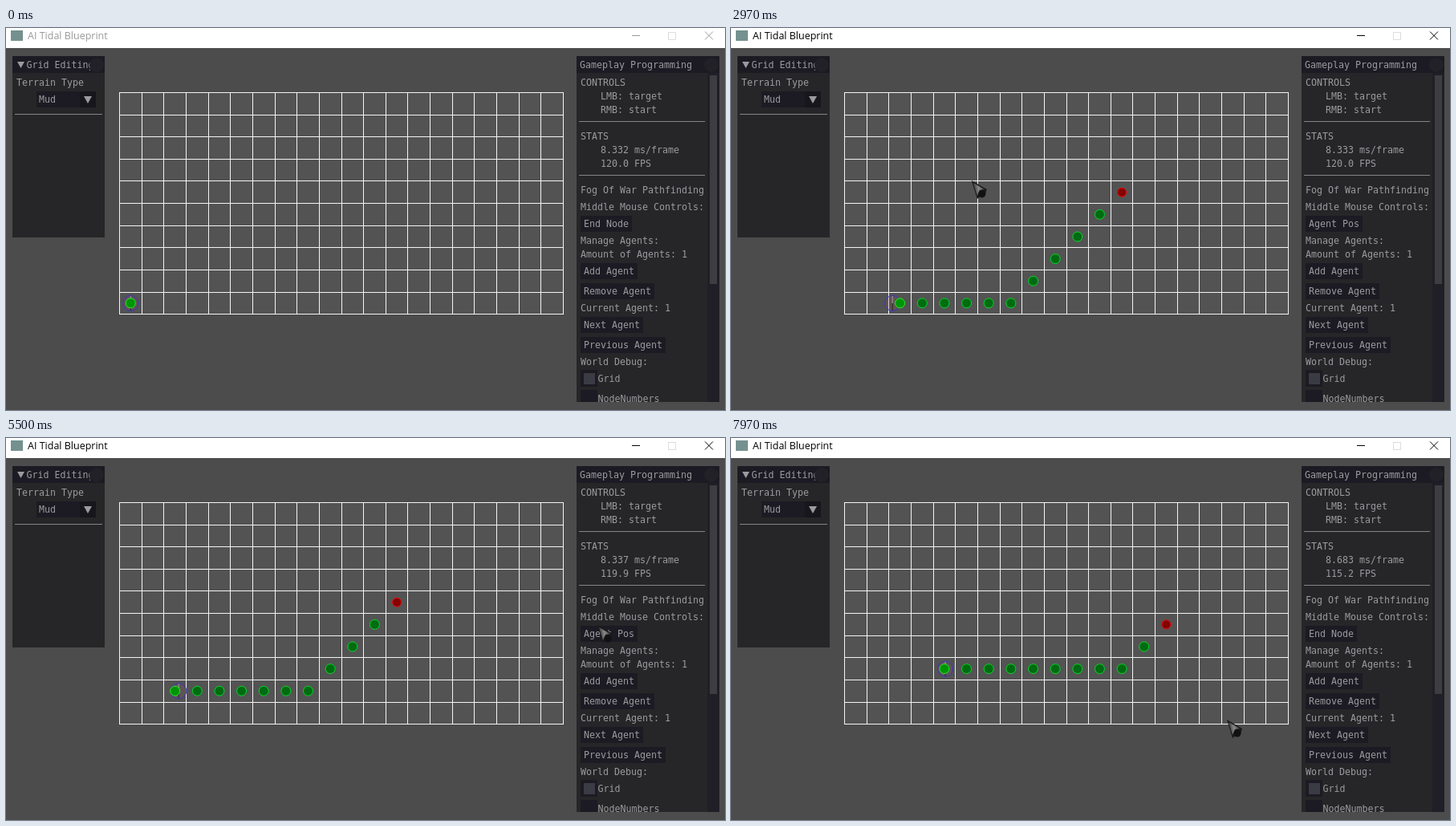
An HTML page with a canvas that plays this animation: 896x476 px, repeating every 8 s.

```html
<!DOCTYPE html>
<html lang="en">
<head>
<meta charset="utf-8">
<title>Grid pathfinding</title>
<style>
  html, body { margin: 0; width: 100%; height: 100%; overflow: hidden; background: #4c4c4c; }
  canvas { display: block; }
</style>
</head>
<body>
<canvas id="stage" width="896" height="476"></canvas>
<script>
const ctx = document.getElementById('stage').getContext('2d');
const LOOP = 8;
const COLS = 20, ROWS = 10;
const LEFT = 141.5, TOP = 80.45, CELL_W = 27.65, CELL_H = 27.62;
const TEXT = '#9b9b9f', PANEL = '#262628', DARK = '#1c1b23';

// Tracks are [seconds, x, y]; a repeated time is a jump.
const agentTrack = [
  [0, 155.3, 343], [1.58, 155.3, 343], [4.08, 237.8, 343],
  [4.08, 199, 149.5], [4.4, 209.5, 149.5],
  [4.4, 179, 315.3], [6.42, 245.5, 315.3], [6.5, 245.5, 315.3],
  [7.32, 245.5, 287.8], [8, 268, 287.8]
];
const cursorTrack = [
  [0.4, 790, 442], [0.85, 781, 300], [1.1, 700, 270], [1.5, 480, 196], [1.6, 483, 198],
  [1.73, 573, 222], [2.1, 735, 232], [2.4, 736, 233], [2.55, 735, 231],
  [2.97, 300, 190], [3.36, 215, 150], [3.7, 200, 126], [4.08, 192, 142],
  [4.21, 178, 220], [4.33, 176, 291], [4.42, 172, 296], [4.7, 190, 300],
  [5.04, 480, 280], [5.5, 737, 233], [5.75, 738, 234], [5.9, 690, 225],
  [6.4, 345, 118], [6.5, 341, 119], [6.86, 533, 235], [6.95, 534, 236],
  [7.4, 610, 338], [7.97, 618, 351]
];
const goalSteps = [[0, null], [1.56, [12, 4]], [6.5, [7, 1]], [6.92, [14, 5]]];
const frameTimes = [
  [0, 8.332], [0.88, 8.333], [1.66, 8.334], [2.57, 8.333], [3.42, 8.334],
  [4.26, 8.331], [5.11, 8.333], [5.44, 8.337], [5.95, 8.332], [6.8, 8.331],
  [7.4, 8.333], [7.9, 8.683]
];

const latest = (steps, t) => steps.filter(s => s[0] <= t).pop()[1];

function along(track, t) {
  const next = track.findIndex(k => k[0] > t);
  if (next < 0) return track[track.length - 1].slice(1);
  if (next === 0) return track[0].slice(1);
  const a = track[next - 1], b = track[next];
  const p = (t - a[0]) / (b[0] - a[0]);
  return a.slice(1).map((v, i) => v + (b[i + 1] - v) * p);
}

function rect(x, y, w, h, color) {
  ctx.fillStyle = color;
  ctx.fillRect(x, y, w, h);
}

function text(str, x, middle, color = TEXT, font = '11.63px "DejaVu Sans Mono", monospace') {
  ctx.font = font;
  ctx.fillStyle = color;
  ctx.fillText(str, x, middle + 4);
}

function polyline(points, color, width = 1) {
  ctx.beginPath();
  points.forEach(([x, y]) => ctx.lineTo(x, y));
  ctx.strokeStyle = color;
  ctx.lineWidth = width;
  ctx.stroke();
}

function polygon(points, fill) {
  ctx.beginPath();
  points.forEach(([x, y]) => ctx.lineTo(x, y));
  ctx.fillStyle = fill;
  ctx.fill();
}

function circle(x, y, r, fill, stroke) {
  ctx.beginPath();
  ctx.arc(x, y, r, 0, Math.PI * 2);
  if (fill) { ctx.fillStyle = fill; ctx.fill(); }
  if (stroke) { ctx.strokeStyle = stroke; ctx.lineWidth = 1; ctx.stroke(); }
}

function clipped(x, y, w, h, paint) {
  ctx.save();
  ctx.beginPath();
  ctx.rect(x, y, w, h);
  ctx.clip();
  paint();
  ctx.restore();
}

function button(label, middle) {
  rect(716, middle - 10, label.length * 7 + 8, 20, DARK);
  text(label, 720, middle);
}

function drawTitleBar(active) {
  const ink = active ? '#000' : '#999';
  rect(0, 0, 896, 25, '#fff');
  rect(6, 3, 15, 13, '#74918f');
  text('AI Tidal Blueprint', 27, 10, ink, '12.5px "Open Sans", sans-serif');
  polyline([[780, 9.5], [790, 9.5]], ink);
  ctx.strokeStyle = '#ddd';
  ctx.strokeRect(825.5, 5.5, 9, 9);
  polyline([[871, 4.5], [881, 14.5]], ink);
  polyline([[881, 4.5], [871, 14.5]], ink);
}

function drawGrid() {
  const right = LEFT + COLS * CELL_W, bottom = TOP + ROWS * CELL_H;
  rect(141, 80, 554, 277, '#535353');
  for (let c = 0; c <= COLS; c++) {
    const x = Math.floor(LEFT + c * CELL_W) + 0.5;
    polyline([[x, 80], [x, Math.floor(bottom) + 1]], '#f4f4f4');
  }
  for (let r = 0; r <= ROWS; r++) {
    const y = Math.floor(TOP + r * CELL_H) + 0.5;
    polyline([[141, y], [Math.floor(right) + 1, y]], '#f4f4f4');
  }
}

// Straight steps first, then diagonal ones into the goal.
function findPath([c, r], [endC, endR]) {
  const path = [[c, r]];
  while (c !== endC || r !== endR) {
    const dc = endC - c, dr = endR - r;
    const w = Math.abs(dc), h = Math.abs(dr);
    if (w >= h) c += Math.sign(dc);
    if (h >= w) r += Math.sign(dr);
    path.push([c, r]);
  }
  return path;
}

function drawAgent(x, y) {
  circle(x, y, 9.5, 'rgba(140,90,90,.22)', '#3a34c4');
  polyline([[x, y - 9], [x, y]], '#a79a9a');
  polyline([[x, y], [x, y + 9]], '#2c2424');
}

function drawPath(x, y, goal) {
  const start = [Math.floor((x - LEFT) / CELL_W), Math.floor((y - TOP) / CELL_H)];
  findPath(start, goal || start).forEach(([c, r], i, path) => {
    const cx = LEFT + (c + 0.5) * CELL_W, cy = TOP + (r + 0.5) * CELL_H;
    if (i === 0) circle(cx, cy, 6, '#009408', '#2be62b');
    else if (i === path.length - 1) circle(cx, cy, 5.5, '#850000', '#f00808');
    else circle(cx, cy, 6, '#006c12', '#08d428');
  });
}

function drawLeftPanel() {
  rect(8, 35, 115, 226, PANEL);
  rect(8, 35, 115, 21, DARK);
  polygon([[14, 42], [23, 42], [18.5, 50]], TEXT);
  clipped(25, 35, 80, 21, () => text('Grid Editing', 25.5, 46));
  circle(113, 46, 9, '#222128');
  text('Terrain Type', 13, 68);
  rect(38, 79, 74, 20, DARK);
  rect(92, 79, 20, 20, '#17161c');
  text('Mud', 41, 89);
  polygon([[97, 85], [107, 85], [102, 94]], TEXT);
  polyline([[11, 107.5], [120, 107.5]], '#858587');
}

function drawRightPanel(t) {
  const ms = latest(frameTimes, t);
  rect(711, 35, 178, 431, PANEL);
  rect(711, 35, 178, 21, DARK);
  text('Gameplay Programming', 715, 46);
  circle(879, 46, 9, '#222128');
  rect(874, 56, 15, 410, '#201f27');
  rect(877, 59, 9, 260, '#3d3d42');

  text('CONTROLS', 716, 68);
  text('LMB: target', 741, 85);
  text('RMB: start', 741, 102);
  polyline([[714, 116.5], [871, 116.5]], '#858587');
  text('STATS', 716, 135);
  text(ms.toFixed(3) + ' ms/frame', 741, 152);
  text((1000 / ms).toFixed(1) + ' FPS', 741, 169);
  polyline([[714, 183.5], [871, 183.5]], '#858587');

  text('Fog Of War Pathfinding', 716, 202);
  text('Middle Mouse Controls:', 716, 223);
  button(t >= 2.3 && t < 5.7 ? 'Agent Pos' : 'End Node', 244);
  text('Manage Agents:', 716, 265);
  text('Amount of Agents: 1', 716, 282);
  button('Add Agent', 303);
  button('Remove Agent', 328);
  text('Current Agent: 1', 716, 349);
  button('Next Agent', 370);
  button('Previous Agent', 395);
  text('World Debug:', 716, 416);
  rect(716, 426, 21, 21, DARK);
  rect(720, 430, 14, 14, '#3b3b43');
  text('Grid', 737.5, 437);
  clipped(711, 448, 163, 18, () => {
    rect(716, 451, 21, 21, DARK);
    text('NodeNumbers', 737.5, 462);
  });
}

function drawCursor(x, y) {
  ctx.save();
  ctx.translate(x, y);
  polygon([[0, 0], [19, 11], [17, 18], [12, 19], [7, 23]], '#1b1b1b');
  const shine = ctx.createLinearGradient(3, 12, 15, 10);
  shine.addColorStop(0, '#3a3a3a');
  shine.addColorStop(0.5, '#8a8a8a');
  shine.addColorStop(1, '#4a4a4a');
  polygon([[2, 3], [16, 11], [10, 12], [7, 19]], shine);
  circle(13, 17, 4.5, '#111');
  ctx.restore();
}

function draw(t) {
  rect(0, 0, 896, 476, '#4c4c4c');
  drawTitleBar(t >= 0.4);
  drawGrid();
  const [x, y] = along(agentTrack, t);
  drawAgent(x, y);
  drawPath(x, y, latest(goalSteps, t));
  drawLeftPanel();
  drawRightPanel(t);
  if (t >= 0.4) drawCursor(...along(cursorTrack, t));
}

const begin = performance.now();
function tick() {
  draw(Math.max(0, performance.now() - begin) / 1000 % LOOP);
  requestAnimationFrame(tick);
}
tick();
</script>
</body>
</html>
```
